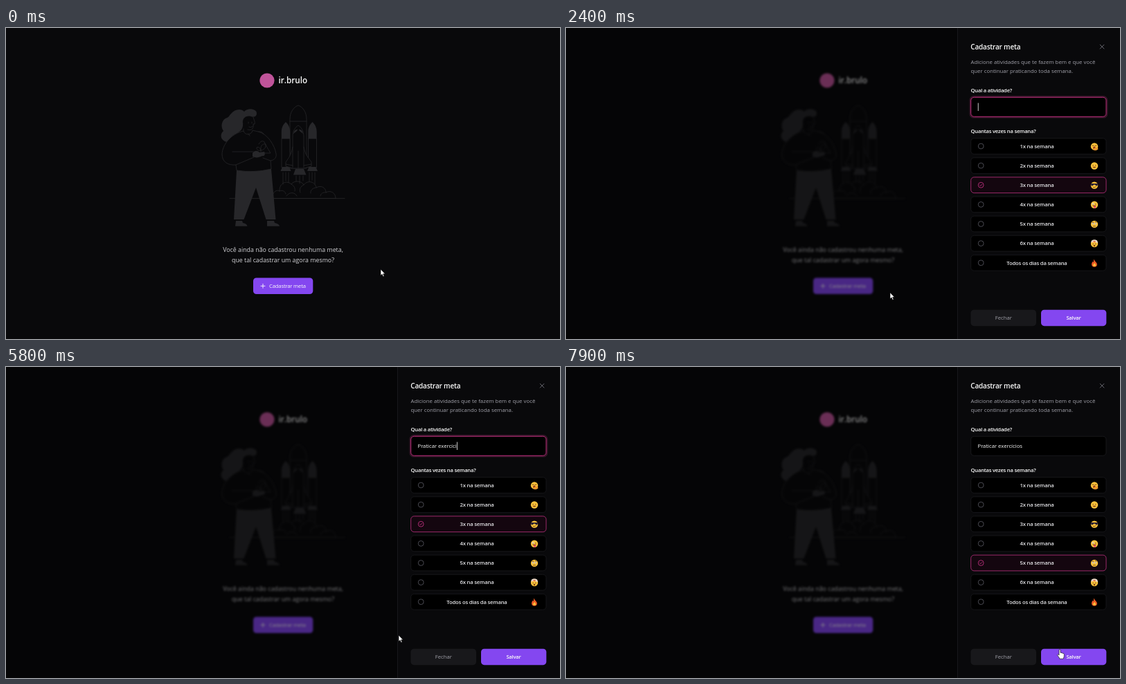
An HTML page that plays this animation: 800x450 px, repeating every 8 s.

```html
<!DOCTYPE html>
<html lang="pt">
<head>
<meta charset="utf-8">
<style>
html, body { margin: 0; width: 100%; height: 100%; overflow: hidden; background: #09090b; }
svg { display: block; width: 800px; height: 450px; }
text { font-family: "Open Sans", "Noto Sans", sans-serif; fill: #fafafa; white-space: pre; }
.label { font-size: 7.7px; font-weight: 600; letter-spacing: -.25px; }
.mid { text-anchor: middle; }
.art { fill: #27272a; }
.line { fill: none; stroke: #27272a; stroke-width: .8; stroke-linecap: round; stroke-linejoin: round; }
.body { fill: #09090b; stroke: #27272a; stroke-width: .8; stroke-linejoin: round; }
.icon { fill: none; stroke-linecap: round; stroke-linejoin: round; }
</style>
</head>
<body>
<svg id="stage" viewBox="0 0 800 450">
  <rect width="800" height="450" fill="#09090b"/>
  <g id="home">
    <circle cx="377" cy="76" r="10.6" fill="#c0549a"/>
    <text x="393.5" y="80" font-size="11.7" font-weight="600">ir.brulo</text>

    <g id="rocket">
      <path class="line" d="M323 246.6H489"/>
      <path class="body" d="M386 246.5C383 238 391 233 395 236C394 226 404 219 412 226C416 220 427 221 430 227C436 219 447 223 448 231C455 227 462 231 462 238C469 234 476 239 476 246.5Z"/>
      <path class="line" d="M395 236C399 234 403 236 404 240M412 226C416 228 418 232 417 236M430 227C425 229 423 234 425 238M448 231C443 231 439 235 440 239M462 238C458 237 454 240 454 243M405 243C409 237 417 237 420 243"/>
      <path class="line" d="M400 209V226M404 209V221M408 209V224M419 214V222M424 214V225M429 214V221M438 209V222M442 209V220M446 209V226"/>
      <path class="body" d="M410 203V132C410 121 416 114 422 112C428 114 434 121 434 132V203Z"/>
      <path class="line" d="M410 135H434"/>
      <g id="booster">
        <path class="body" d="M398 160H410V202H398Z"/>
        <path class="art" d="M397.8 160V150C398 144 400 140 404 136C408 140 410 144 410.2 150V160ZM399 201H409L411.5 207H396.5Z"/>
      </g>
      <use href="#booster" x="38.5"/>
      <path class="body" d="M414 157C414 149 418 143 422 141C426 143 430 149 430 157V172C432 184 437 188 441 194V200L430 203H414L404 200V194C408 188 412 184 414 172Z"/>
      <path class="line" d="M414 172V202M430 172V202M422 178V203M404 197L414 199M441 197L430 199"/>
      <path class="art" d="M415 153C416 148 419 146 421.3 147L419.5 149.5ZM429 153C428 148 425 146 422.7 147L424.5 149.5ZM418 204H430L433.5 212.5H415Z"/>
    </g>

    <g id="woman">
      <path class="art" d="M344 121C348 116 358 116 361.5 121C363.5 127 359 130 354 128C346 126 341 131 342 138C343 146 338 150 332 153C327 155 325 160 319 165C310 163 308 154 314 149C309 142 312 132 319 130C322 129 322 127 325 124C330 117 340 116 344 121Z"/>
      <path class="line" d="M364 150C370 149 373 153 374 158M342 138C339 135 337 139 340 142M357 129C358 133 360 136 359 139H357C358 145 355 149 349 147M350 136V138M355 136V138M351 143C353 144 355 144 356 142M343 146V151"/>
      <path class="body" d="M343 149C325 153 312 169 312 183C312 194 321 199 332 198L333 206Q358 210 383 204L382 192C388 191 391 187 390 182C388 170 378 153 364 150L356 148C355 155 345 156 343 149Z"/>
      <path class="line" d="M327 179L357 179M332 198L358 187M382 192L371 188M373 165C375 170 378 174 382 181L372 181M350 153L352 156"/>
      <path class="art" d="M356 181C359 177 363 177 366 180L373 179C375 183 373 186 370 185C365 188 360 188 356 186Z"/>
      <path class="line" d="M368 179C368 174 365 171 362 173C362 177 365 178 368 177C371 177 376 174 375 168C370 167 367 171 368 177M365 168C367 164 371 162 373 165"/>
      <path class="art" d="M333 206Q358 210 383 204L389.5 277H375.5L361 231L343.5 277H329ZM332 279H341L342 282C346 283 348 284 348.5 286.8H331ZM377 279H387L388 282C392 283 394.5 284 395 286.8H377Z"/>
    </g>

    <g class="mid" font-size="8.83">
      <text x="400" y="323.5" style="fill:#d4d4d8">Você ainda não cadastrou nenhuma meta,</text>
      <text x="400" y="338.5" style="fill:#d4d4d8">que tal cadastrar um agora mesmo?</text>
    </g>
    <rect id="add" x="357" y="361.5" width="86.3" height="23.5" rx="4.6"/>
    <path class="icon" d="M368 373.3H374M371 370.3V376.3" stroke="#fafafa" stroke-width=".9"/>
    <text class="label" x="380" y="376" style="font-weight:500;letter-spacing:-.18px">Cadastrar meta</text>
  </g>

  <g id="dialog">
    <rect width="800" height="450" opacity=".45"/>
    <rect x="565.5" y="-1" width="236" height="452" fill="#09090b" stroke="#18181b"/>
    <text x="584.3" y="31.2" font-size="10" font-weight="600" letter-spacing="-.2">Cadastrar meta</text>
    <path class="icon" d="M771.2 24.2L777 30M777 24.2L771.2 30" stroke="#71717a" stroke-width=".9"/>
    <g font-size="7.84">
      <text x="584.5" y="51.5" style="fill:#a1a1aa">Adicione atividades que te fazem bem e que você</text>
      <text x="584.5" y="65" style="fill:#a1a1aa">quer continuar praticando toda semana.</text>
    </g>
    <text class="label" x="584.5" y="92.5">Qual a atividade?</text>
    <rect id="ring" x="583.4" y="99" width="198" height="30.6" rx="5.6" fill="none" stroke="#ec4899" stroke-opacity=".2" stroke-width="2"/>
    <rect id="field" x="584.7" y="100.3" width="195.3" height="28" rx="4.6"/>
    <text id="typed" x="594.5" y="117.2" font-size="7.7"></text>
    <rect id="caret" y="108.5" width=".8" height="11.5" fill="#fafafa"/>
    <text class="label" x="584.5" y="151.5">Quantas vezes na semana?</text>
    <g id="rows"></g>
    <rect x="584.5" y="407.7" width="94.5" height="23.5" rx="4.6" fill="#18181b"/>
    <text class="label mid" x="631.8" y="422.3" style="fill:#a1a1aa;font-weight:500;letter-spacing:0">Fechar</text>
    <rect x="686" y="407.7" width="94.3" height="23.5" rx="4.6" fill="#8447f0"/>
    <text class="label mid" x="733" y="422.3">Salvar</text>
  </g>

  <g id="mouse">
    <path id="arrow" d="M0 0V9.2L2.1 7.3L3.6 10.7L5.1 10L3.6 6.8H6.4Z" fill="#fff" stroke="#000" stroke-width=".6"/>
    <path id="hand" d="M-1 .6C-1 -.7 1 -.7 1 .6V4.6C1.6 4 2.6 4.2 2.8 5C3.5 4.4 4.5 4.7 4.6 5.6C5.4 5.1 6.3 5.6 6.3 6.5V9.3C6.3 11 5.4 11.6 5.2 13.2H-.2C-.4 11.4 -2.2 10 -3.2 8C-3.7 6.8 -2.4 6.2 -1.6 7.2L-1 8Z" fill="#fff" stroke="#000" stroke-width=".6"/>
  </g>
</svg>
<script>
const $ = id => document.getElementById(id);
const LOOP = 8000, OPEN = 2400, BLUR = 7500, PICK = 7600;
const PINK = '#c0307f', DARK = '#18181b';
const rowY = i => 171 + i * 28.13;

// Small faces, drawn around 0,0
const dots = (y = -1) => `<path d="M-1.9 ${y}v.1M1.9 ${y}v.1" stroke="#57300c" stroke-width="1.3" stroke-linecap="round"/>`;
const curve = (d, c = '#57300c') => `<path d="${d}" fill="none" stroke="${c}" stroke-width=".8" stroke-linecap="round"/>`;
const face = inner => `<circle r="5.2" fill="#fcc23c"/>${inner}`;
const emoji = [
  face(curve('M-3-1.2h2M1-1.2h2') + '<ellipse cy="2" rx="1.8" ry="2" fill="#8a2c1c"/><path d="M-1 5.4C-2 2 2 .6 5 1.6L5.4 4Q3 6.5-1 5.4Z" fill="#e9962a"/>'),
  face(dots() + '<path d="M-2.8 1.2H2.8Q0 4.6-2.8 1.2Z" fill="#7a3a14"/>'),
  face('<path d="M-5.3-2.6H5.3L4.4.6Q2.4 1.6.8-.9H-.8Q-2.4 1.6-4.4.6Z" fill="#2a2035"/>' + curve('M-1.8 2.8Q.6 3.6 2.2 2')),
  face('<circle cx="-1.9" cy="-1.2" r="1.3" fill="#fff"/>' + dots() + '<path d="M-3 1H3Q0 4-3 1Z" fill="#7a3a14"/><path d="M-.8 2H2V4.2Q.6 5.6-.8 4.2Z" fill="#f0466a"/>'),
  face('<circle cx="-1.9" cy="-.8" r="1.3" fill="#fff"/><circle cx="1.9" cy="-.8" r="1.3" fill="#fff"/>' + dots(-.8) + curve('M-3.2-2.6h2M1.2-3.4l2 .6M-1.6 2.8h3.2')),
  face('<path d="M-5.2-1L-3.4-2.4L-1.6-1.6L.4-2.6L2.4-1.6L5.2-1L4-4.6Q0-7-4-4.6Z" fill="#ead9c8"/><path d="M-2.6-2.2L0-4.4L2.6-2.2Z" fill="#e4643a"/>' + dots(.4) + '<ellipse cy="2.9" rx="1.3" ry="1.2" fill="#7a3a14"/>'),
  '<path d="M-.6-5.6C0-2.6 3.9-1 3.9 2C3.9 4.4 2 5.6 0 5.6C-2.4 5.6-4 4.2-4 1.8C-4 0-3-1-2.6-2.4L-1.6-1.2C-.6-2.4-1.2-4.2-.6-5.6Z" fill="#ee5a24"/><path d="M.2-.4C.6 1.2 2.2 1.8 2.2 3.4C2.2 5-1.9 5.2-2.1 3.2C-2.2 1.8 0 1.4.2-.4Z" fill="#fcc23c"/>'
];

$('rows').innerHTML = emoji.map((art, i) => `<g transform="translate(0 ${rowY(i)})">
  <rect x="584.7" y="-11.4" width="195.3" height="22.8" rx="4.6" stroke-width=".9"/>
  <circle cx="599.2" r="3.9" fill="none" stroke-width=".9"/>
  <path class="icon" d="M597.6 .1l1.2 1.1 2-2.2" stroke="${PINK}" stroke-width=".9"/>
  <text class="label mid" x="680" y="2.8" style="fill:#e4e4e7;letter-spacing:-.2px">${i < 6 ? i + 1 + 'x na semana' : 'Todos os dias da semana'}</text>
  <g transform="translate(763 .4)">${art}</g></g>`).join('');
const rows = [...$('rows').children].map(g => ({
  box: g.querySelector('rect'), radio: g.querySelector('circle'), check: g.querySelector('path')
}));

// Time, x, y of the pointer
const path = [
  [0, 541, 349], [300, 537, 354], [600, 537, 354], [800, 532, 362], [900, 532, 362],
  [1000, 522, 370], [1200, 522, 370], [1500, 485, 380], [1700, 485, 380], [2000, 441, 384],
  [2100, 435, 381], [2300, 435, 381], [2700, 567, 388], [6800, 567, 388],
  [7300, 657, 292], [7600, 657, 292], [7900, 713, 409]
];
const words = 'Praticar exercícios';
const keys = [31, 32, 33, 34, 36, 37, 39, 40, 45, 47, 48, 49, 50, 51, 54, 56, 57, 59, 61].map(k => k * 100);

function pointer(t) {
  const i = path.findIndex(p => p[0] > t);
  if (i < 0) return path[path.length - 1].slice(1);
  const [a, b] = [path[i - 1], path[i]], k = (t - a[0]) / (b[0] - a[0]);
  return [a[1] + (b[1] - a[1]) * k, a[2] + (b[2] - a[2]) * k];
}
const within = ([x, y], l, t, r, b) => x >= l && x <= r && y >= t && y <= b;
const show = (el, on) => el.setAttribute('visibility', on ? 'inherit' : 'hidden');
const set = (el, fill, stroke) => { el.setAttribute('fill', fill); el.setAttribute('stroke', stroke); };

function draw(t) {
  const open = t >= OPEN, focus = open && t < BLUR, at = pointer(t);
  $('home').style.filter = open ? 'blur(1.7px)' : 'none';
  show($('dialog'), open);
  $('add').setAttribute('fill', !open && within(at, 357, 361, 443, 385) ? '#7527dd' : '#8447f0');

  const typed = keys.filter(k => k <= t);
  const last = typed.length ? typed[typed.length - 1] : OPEN;
  $('typed').textContent = words.slice(0, typed.length);
  $('caret').setAttribute('x', 594.8 + (typed.length ? $('typed').getComputedTextLength() : 0));
  show($('caret'), focus && (t - last) % 1000 < 500);
  show($('ring'), focus);
  set($('field'), '#000', focus ? PINK : DARK);

  const picked = t < PICK ? 2 : 4;
  let hand = open && within(at, 686, 407, 780, 431);
  rows.forEach((row, i) => {
    const on = i === picked, y = rowY(i), over = open && within(at, 584, y - 11.5, 780, y + 11.5);
    hand = hand || over;
    set(row.box, on ? '#14060f' : '#000', on ? '#ab2d74' : over ? '#2b2b30' : DARK);
    row.radio.setAttribute('stroke', on ? PINK : '#52525b');
    show(row.check, on);
  });
  $('mouse').setAttribute('transform', `translate(${at})`);
  show($('arrow'), !hand);
  show($('hand'), hand);
}

function tick() {
  draw(Math.floor(performance.now() % LOOP / 100) * 100);
  requestAnimationFrame(tick);
}
tick();
</script>
</body>
</html>
```
